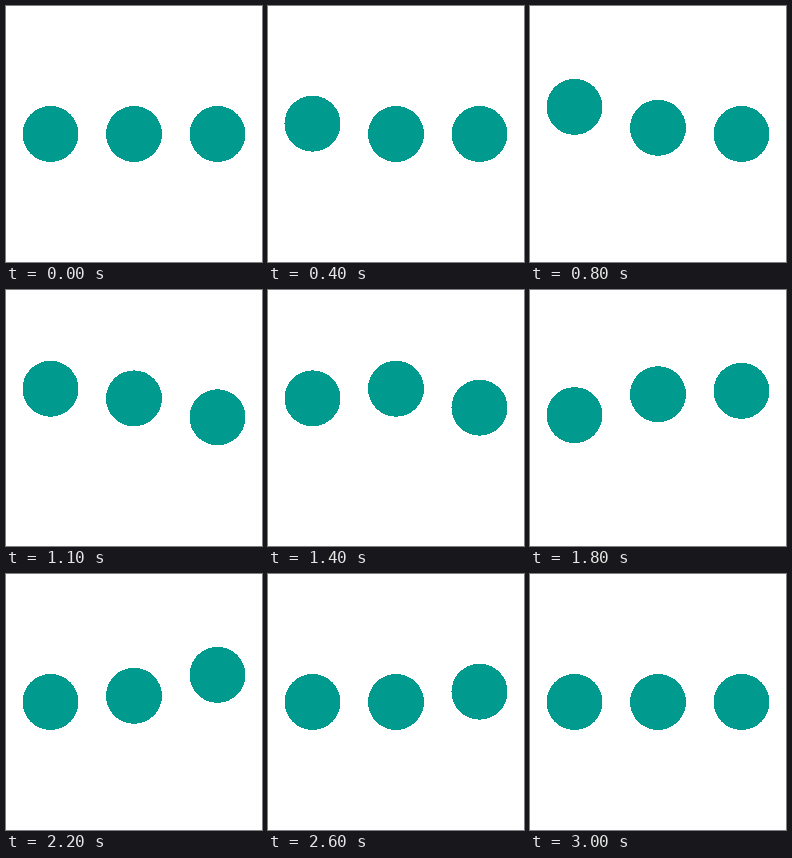
Write an HTML page that moves like this. It is 256x256 px and loops after 3.1 s.

```html
<!DOCTYPE html>
<html lang="en">
<head>
<meta charset="utf-8">
<title>Bouncing dots</title>
<style>
  html, body { margin: 0; height: 100%; overflow: hidden; background: #fff; }
  svg { display: block; width: 256px; height: 256px; fill: #009a8e; shape-rendering: crispEdges; }
</style>
</head>
<body>
<svg viewBox="0 0 256 256">
  <circle cx="44.5" cy="128" r="28"/>
  <circle cx="128" cy="128" r="28"/>
  <circle cx="211.5" cy="128" r="28"/>
</svg>
<script>
  const LOOP = 3100, STEP = 100, BOUNCE = 2000, DELAY = 500, HEIGHT = 30;
  const dots = document.querySelectorAll('circle');
  const start = performance.now();

  function draw(now) {
    const elapsed = Math.max(0, now - start) % LOOP;
    const time = Math.floor(elapsed / STEP) * STEP;
    dots.forEach((dot, i) => {
      const p = Math.min(1, Math.max(0, (time - i * DELAY) / BOUNCE));
      dot.setAttribute('cy', 128 - HEIGHT * Math.sin(Math.PI * p) ** 2);
    });
    requestAnimationFrame(draw);
  }
  draw(start);
</script>
</body>
</html>
```
